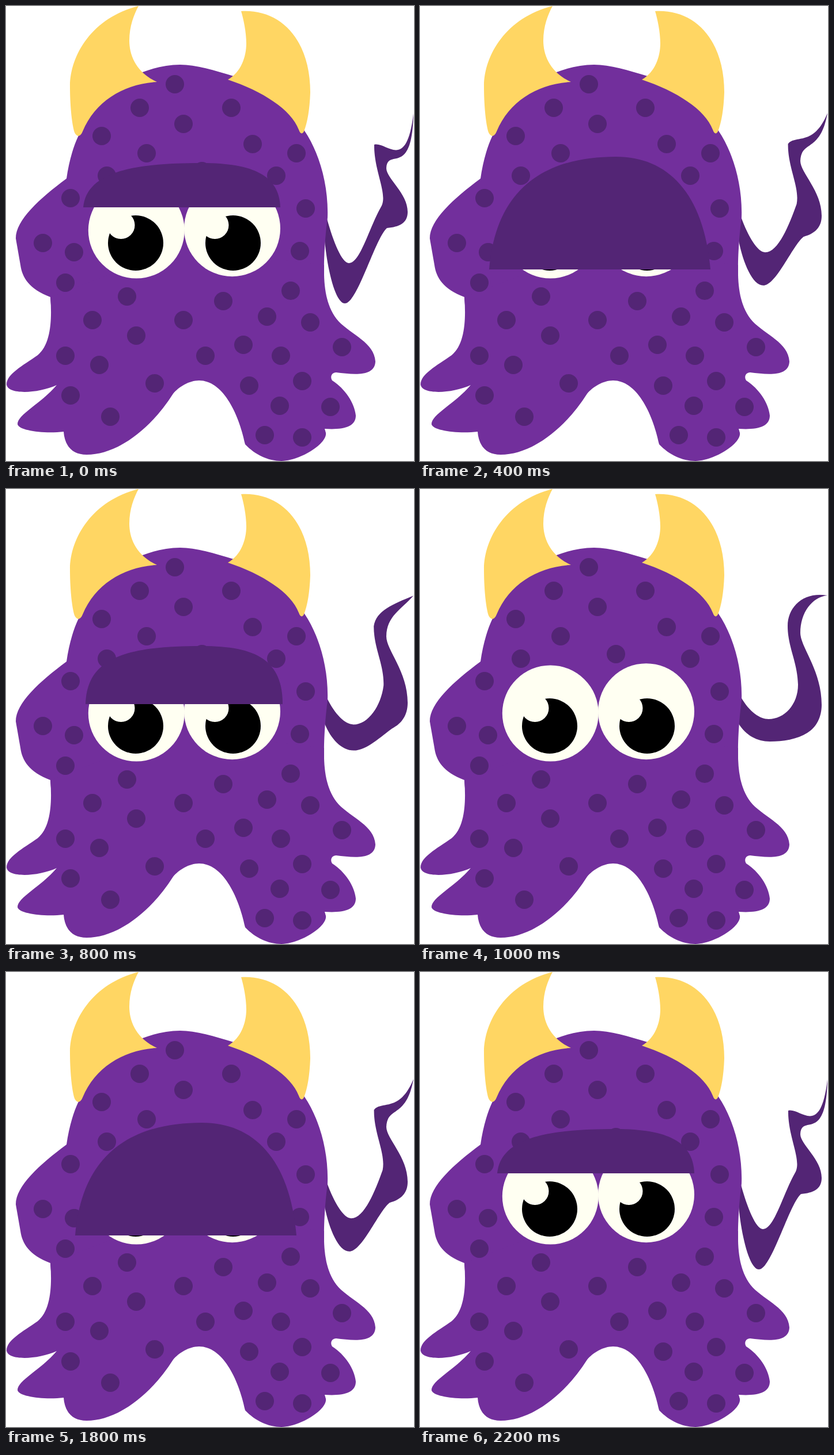
An HTML page for the animation above (2400 ms loop, 708 px wide and 791 px high).

```html
<!DOCTYPE html>
<html lang="en">
<head>
<meta charset="utf-8">
<title>Blinking monster</title>
<style>
  html, body { margin: 0; width: 100%; height: 100%; overflow: hidden; background: #fff; }
  svg { display: block; width: 100%; height: 100%; }
  .body { fill: #722f9c; }
  .dark { fill: #532575; }
  .horn { fill: #ffd663; }
  .white { fill: #fffff2; }
</style>
</head>
<body>
<svg viewBox="0 0 708 791">
  <path id="tail" class="dark"/>
  <path class="body" d="M77 506C40 492 28 472 25 450C22 432 19 416 17 404C17 372 58 335 105 300
    C109 272 116 246 126 225C150 165 200 124 237 115C258 107 280 102 302 102
    C330 102 362 112 395 122C450 140 495 180 518 217C543 254 560 310 558 368
    C555 390 552 425 552 455L552 485L300 560L78 520Z"/>
  <path class="body" d="M77 506C80 545 78 588 55 607C28 626 1 640 1 658C3 676 55 674 88 659
    C60 692 20 710 20 727C22 738 65 744 100 740C102 766 116 780 140 780
    C190 780 248 740 290 674C300 662 318 651 335 651C375 651 403 705 415 762
    C432 780 455 791 478 791C512 790 558 760 555 742L553 735
    C585 737 607 732 607 712C605 690 588 665 566 651C562 645 565 637 573 637
    C600 640 640 646 641 618C639 585 600 572 577 548C556 524 551 490 552 450L300 420Z"/>
  <g id="dots" class="dark"></g>
  <path class="horn" d="M230 0C150 20 111 85 111 140C111 170 114 205 119 220C123 228 129 228 133 218
    C155 165 205 135 262 132C225 115 214 85 214 60C214 35 222 15 230 0Z"/>
  <path class="horn" d="M408 9C478 5 528 60 528 150C527 180 523 203 517 218C514 223 511 223 508 215
    C495 180 445 148 385 128C408 115 417 88 417 65C417 45 412 22 408 9Z"/>
  <g id="eyes"></g>
  <path id="lid" class="dark"/>
</svg>
<script>
  const $ = id => document.getElementById(id);
  const circle = (x, y, r, attr = '') => `<circle cx="${x}" cy="${y}" r="${r}" ${attr}/>`;

  const dots = [
    [293, 136], [232, 177], [391, 177], [308, 205], [166, 226], [428, 240], [244, 256], [504, 256],
    [175, 295], [469, 295], [340, 287], [112, 334], [520, 352], [64, 412], [118, 428], [510, 426],
    [103, 481], [494, 495], [210, 505], [377, 513], [150, 546], [308, 546], [453, 540], [528, 550],
    [226, 573], [412, 589], [583, 593], [103, 608], [346, 608], [477, 608], [162, 624], [258, 656],
    [422, 660], [514, 652], [112, 677], [475, 695], [563, 697], [181, 714], [449, 746], [514, 750]
  ];
  $('dots').innerHTML = dots.map(([x, y]) => circle(x, y, 16)).join('');

  const eye = (x, y, pupilX, glintX) =>
    circle(x, y, 83.5, 'class="white"') +
    circle(pupilX, 412, 48) +
    circle(glintX, 381, 24, 'class="white"');
  $('eyes').innerHTML = eye(226.3, 390, 225, 199.5) + eye(392.5, 386.7, 394, 362.5);

  const tailBent =
    'M557 370C568 410 583 447 595 447C615 447 630 385 652 347C662 325 638 285 639 241' +
    'C660 235 695 290 707 187C705 300 662 245 660 282C660 300 697 325 697 358' +
    'C697 378 682 384 661 386C640 405 610 517 588 517C572 517 558 460 553 408L540 390Z';
  const tailCurled =
    'M557 362C572 388 590 400 605 400C632 400 656 375 656 340C655 300 638 275 638 238' +
    'C638 205 665 178 707 185C680 188 660 215 660 250C660 275 697 315 697 375' +
    'C697 397 688 414 672 424C655 435 630 439 607 439C585 439 565 428 553 408L540 390Z';
  const lids = [
    'M134 350C140 285 230 273 340 273C430 273 474 295 476 350Z',
    'M120 458C132 310 225 262 340 262C430 262 492 325 504 458Z',
    'M138 374C140 290 215 273 340 273C435 273 480 298 480 374Z'
  ];

  // Blends two paths that share the same commands.
  function mix(a, b, t) {
    const to = b.match(/\d+/g);
    let i = 0;
    return a.replace(/\d+/g, n => +(+n + (to[i++] - n) * t).toFixed(2));
  }

  const STEP = 200, STEPS = 12, LAST = 5;

  function draw(ms) {
    const step = Math.floor(ms / STEP) % STEPS;
    const pose = Math.min(step, STEPS - 1 - step);
    $('tail').setAttribute('d', mix(tailBent, tailCurled, pose / LAST));
    const open = pose === LAST;
    $('lid').style.display = open ? 'none' : '';
    if (!open) {
      const from = lids[pose >> 1], to = lids[(pose + 1) >> 1];
      $('lid').setAttribute('d', mix(from, to, 0.5));
    }
  }

  let start;
  function tick(now) {
    start ??= now;
    draw(now - start);
    requestAnimationFrame(tick);
  }
  draw(0);
  requestAnimationFrame(tick);
</script>
</body>
</html>
```
